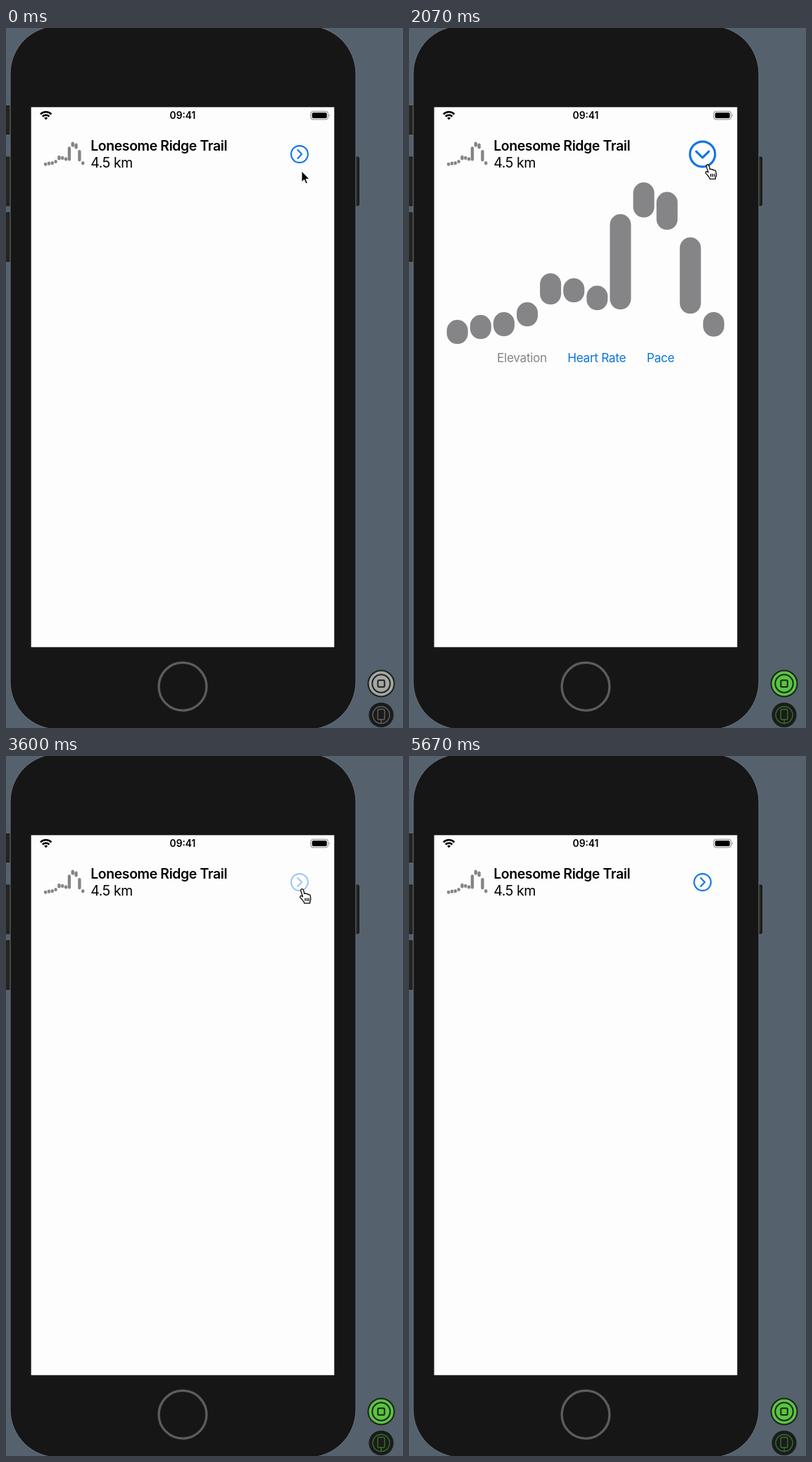
Recreate the animation shown at these times as an HTML page. Size 564 px wide and 993 px high, loop 5.74 s.

```html
<!DOCTYPE html>
<html lang="en">
<head>
<meta charset="utf-8">
<title>Hike detail toggle</title>
<style>
  html, body { margin: 0; width: 100%; height: 100%; overflow: hidden; background: #55616d; }
  svg { display: block; width: 564px; height: 993px; }
  text { font-family: Inter, "Open Sans", sans-serif; }
  .row { font-size: 19.5px; letter-spacing: -.42px; }
  .tab { font-size: 17.2px; letter-spacing: -.3px; fill: #0b74de; }
  .line { fill: none; stroke-linecap: round; stroke-linejoin: round; }
</style>
</head>
<body>
<svg viewBox="0 0 564 993">
  <rect width="564" height="993" fill="#55616d"/>

  <g fill="#24241f" stroke="#121212">
    <rect x="-3" y="110.5" width="12" height="40" rx="2"/>
    <rect x="-3" y="183" width="12" height="69" rx="2"/>
    <rect x="-3" y="262" width="12" height="69" rx="2"/>
    <rect x="491" y="183" width="10.5" height="69" rx="2"/>
  </g>
  <rect x="6" y="-3" width="491" height="998" rx="68" fill="#161616" stroke="#69747f"/>
  <circle cx="251" cy="934.2" r="33.9" fill="none" stroke="#5c5c5c" stroke-width="3.4"/>
  <rect x="35.7" y="112.3" width="430.6" height="766" fill="#fdfdfd"/>

  <!-- status bar -->
  <g class="line" stroke="#000" stroke-width="2.6" style="stroke-linecap:butt">
    <path d="M49 122.3a10.8 10.8 0 0 1 15.4 0M51.9 125.5a6.8 6.8 0 0 1 9.6 0"/>
    <path d="M56.7 130.3l-2.5-2.6a3.6 3.6 0 0 1 5 0z" fill="#000" stroke="none"/>
  </g>
  <text x="251" y="129.3" font-size="13.8" font-weight="600" text-anchor="middle">09:41</text>
  <rect x="433" y="118.2" width="24.6" height="11.6" rx="3.2" fill="none" stroke="#808080"/>
  <rect x="434.8" y="120" width="21" height="8" rx="1.8"/>
  <path d="M459 122.2q2 1.8 0 3.6z" fill="#808080"/>

  <!-- hike row -->
  <g id="mini" fill="#858588" transform="translate(54 161.4) scale(.1458 .15) translate(-54 -219)"></g>
  <text class="row" x="120.2" y="174" font-weight="600">Lonesome Ridge Trail</text>
  <text class="row" x="120.3" y="197.6">4.5 km</text>

  <g id="detail">
    <g id="chart" fill="#858588"></g>
    <text class="tab" x="125" y="474" style="fill:#858588">Elevation</text>
    <text class="tab" x="225.2" y="474">Heart Rate</text>
    <text class="tab" x="337.8" y="474">Pace</text>
  </g>

  <g id="toggle" class="line" stroke="#1075ea" stroke-width="2.1">
    <circle r="11.9"/>
    <path d="M-2.6-6L3.2 0L-2.6 6"/>
  </g>

  <!-- preview controls -->
  <g class="line" stroke="#1b231b" stroke-width="2">
    <circle id="live" cx="533" cy="930" r="18.5"/>
    <circle cx="533" cy="930" r="12.7"/>
    <rect x="528.3" y="925.3" width="9.4" height="9.4" rx="1.5"/>
  </g>
  <circle cx="533" cy="974.5" r="17.6" fill="#1b1b1b"/>
  <g id="device" class="line" stroke-width="1.4">
    <circle cx="533" cy="974.5" r="12"/>
    <rect x="528.2" y="966.5" width="9.6" height="14.5" rx="1.5" fill="#1b1b1b"/>
    <path d="M533 981v5"/>
  </g>

  <g id="cursor" stroke-linejoin="round">
    <path id="arrow" stroke="#fff" d="M0 0V15.5L3.6 12.2L6 17.8L8.4 16.8L6.1 11.3H11z"/>
    <g id="hand" stroke="#000" stroke-width="1.2" transform="translate(-.7 0) scale(1.06)">
      <path fill="#fff" d="M0 0c1.2 0 1.9.8 2.1 2l.9 4.2c1-.8 2.2-.6 2.7.4 1-.5 2.1-.1 2.5.9 1.4-.5 2.6.3 2.8 1.6l.5 3.6c.2 2-.6 3.4-1 4.6v1.7h-7.6l-.4-1.5c-1.3-1.9-2.8-4-4.6-5.6-1-1-.8-2.6.6-2.8 1-.1 1.8.6 2.4 1.2L-1.8 2.2C-2 .9-1.2 0 0 0z"/>
      <path d="M4.2 12v4M6.6 12v4M9 12v4"/>
    </g>
  </g>
</svg>
<script>
const LOOP = 5740, ACTIVE = 400;
const toggles = [1190, 2430, 3665, 4970];
const bars = [[414, 448], [407, 441], [403, 437], [389, 423], [348, 392], [355, 389],
  [365.5, 400], [264, 399], [219, 268.5], [232.5, 286], [297, 405], [403, 437.5]];
// cursor keys: time, x, y
const path = [[0, 420, 203], [70, 420, 203], [500, 424, 190], [1100, 423, 182], [1300, 423, 182],
  [2070, 425, 194], [3000, 422, 190], [3930, 421, 188], [4870, 416, 195], [5100, 416, 195],
  [5530, 443, 922], [5600, 474, 955], [5740, 520, 1010]];

const $ = id => document.getElementById(id);
const clamp = v => Math.max(0, Math.min(1, v));
const mix = (a, b, p) => a + (b - a) * p;
const smooth = p => (p = clamp(p), p * p * (3 - 2 * p));
const show = (id, on) => $(id).style.display = on ? "" : "none";

$("chart").innerHTML = $("mini").innerHTML = bars.map(([top, bottom], i) =>
  `<rect x="${53.7 + i * 33.1}" y="${top}" width="30" height="${bottom - top + .3}" rx="15"/>`).join("");

function drawToggle(t) {
  let open = 0, fade = 0, shown = false;
  toggles.forEach((at, i) => {
    const target = i % 2 ? 0 : 1;
    if (t >= at) {
      open = mix(1 - target, target, smooth((t - at) / 350));
      shown = !!target;
    }
    // the button dims while held and recovers on release
    const held = clamp((t - at + 130) / 80), released = clamp((t - at - 20) / 200);
    fade = Math.max(fade, held * (1 - released));
  });
  show("detail", shown);
  $("toggle").setAttribute("transform",
    `translate(417 179) rotate(${90 * open}) scale(${1 + open / 2})`);
  $("toggle").setAttribute("opacity", 1 - .73 * fade);
}

function drawCursor(t) {
  const i = path.findIndex(key => key[0] > t);
  const [t0, x0, y0] = path[i - 1], [t1, x1, y1] = path[i];
  const p = (t - t0) / (t1 - t0), x = mix(x0, x1, p), y = mix(y0, y1, p);
  const pointing = t >= ACTIVE && y < 878;
  $("cursor").setAttribute("transform", `translate(${x} ${y})`);
  show("cursor", t < 5640);
  show("hand", pointing);
  show("arrow", !pointing);
}

function frame(now) {
  const t = now % LOOP, active = t >= ACTIVE;
  $("live").setAttribute("fill", active ? "#5ac540" : "#a6a6a6");
  $("device").setAttribute("stroke", active ? "#34702b" : "#626262");
  drawToggle(t);
  drawCursor(t);
  requestAnimationFrame(frame);
}
frame(0);
</script>
</body>
</html>
```
